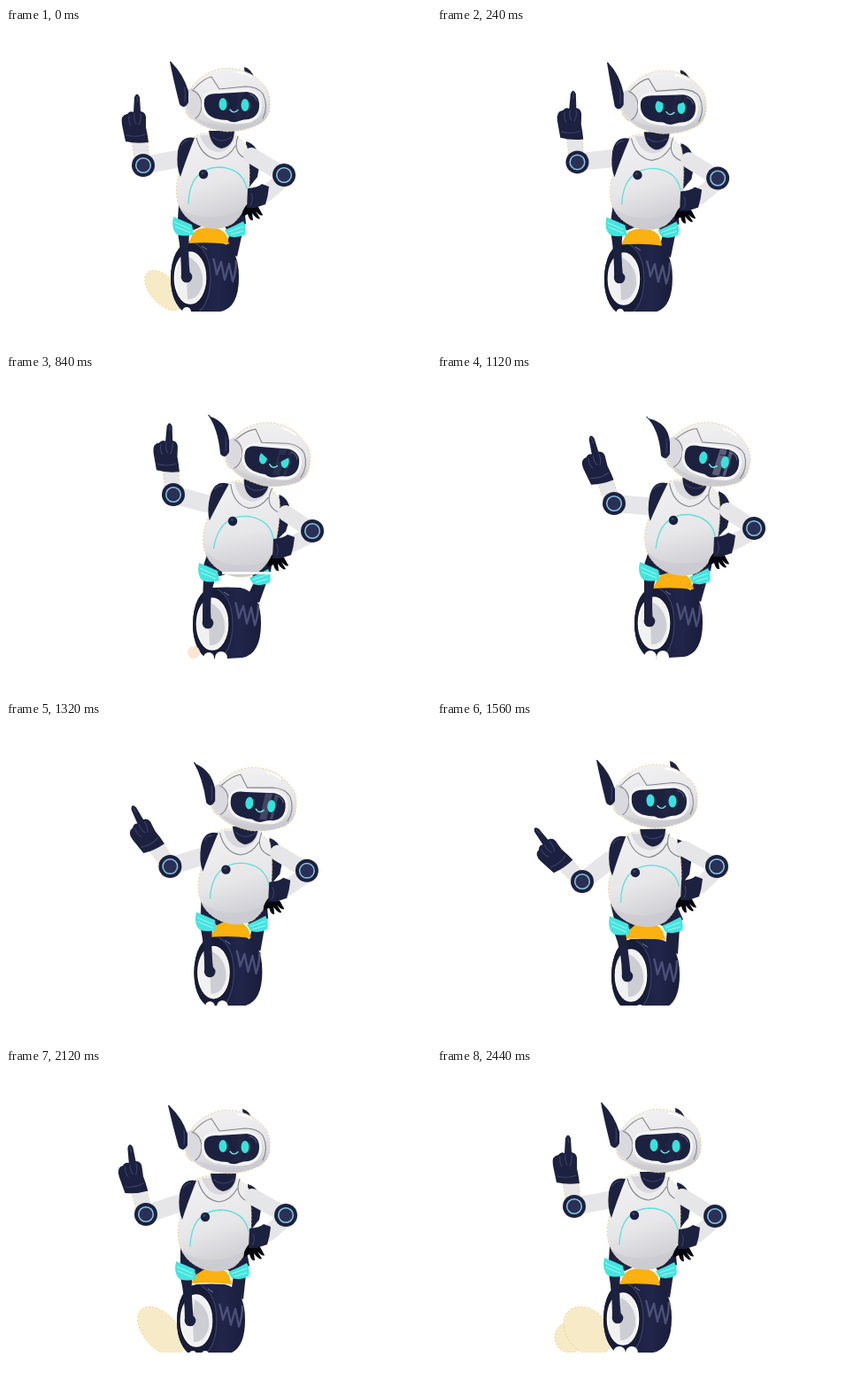
Write an HTML page that moves like this. It is 480 px wide and 360 px high and loops after 2.48 s.

```html
<!DOCTYPE html>
<html lang="en">
<head>
<meta charset="utf-8">
<title>Robot on a wheel</title>
<style>
html, body { margin: 0; width: 100%; height: 100%; overflow: hidden; background: #fff; }
svg { display: block; width: 100vw; height: 100vh; }
.ink { fill: #1d2140; }
.line { fill: none; stroke: #85868c; stroke-width: 1.1; stroke-linecap: round; stroke-linejoin: round; }
.cyan { fill: none; stroke: #62dfdc; stroke-width: 1.3; stroke-linecap: round; }
.glow { fill: #35e3dc; }
.edge { stroke: #e9c566; stroke-width: .7; stroke-dasharray: 2 2; }
.limb { fill: none; stroke: #e6e6e9; stroke-linecap: round; }
.crease { fill: none; stroke: #3b4068; stroke-width: 1.1; stroke-linecap: round; }
</style>
</head>
<body>
<svg viewBox="0 0 480 360" xmlns="http://www.w3.org/2000/svg">
  <defs>
    <linearGradient id="shell" x1="0" y1="0" x2=".25" y2="1">
      <stop offset="0" stop-color="#f3f3f4"/><stop offset=".62" stop-color="#e7e7e9"/><stop offset="1" stop-color="#cfcfd4"/>
    </linearGradient>
    <linearGradient id="tyre" x1="0" y1="0" x2="1" y2="0">
      <stop offset="0" stop-color="#191d39"/><stop offset=".7" stop-color="#20254a"/><stop offset="1" stop-color="#191d39"/>
    </linearGradient>
    <clipPath id="ground"><rect width="480" height="320"/></clipPath>
    <clipPath id="disc"><ellipse cx="208" cy="282" rx="17.5" ry="29"/></clipPath>
  </defs>

  <g clip-path="url(#ground)">
    <g fill="#f7ebc7" class="edge">
      <ellipse id="dustB"/><ellipse id="dustA"/>
    </g>
    <path id="shinR" class="ink"/>
    <g id="wheel">
      <path fill="url(#tyre)" d="M208 241 Q224 240 240 241 Q263 246 263 281 Q263 316 242 320 L208 322 Q186 316 186 282 Q187 246 208 241Z"/>
      <ellipse cx="208" cy="282" rx="22" ry="40.5" fill="#181c36"/>
      <path class="crease" d="M214 243 Q231 252 231 283 Q230 310 219 319"/>
      <path id="tread" fill="none" stroke="#4b5078" stroke-width="2.4" stroke-linejoin="round" d="M234 260 Q236 266 238 278 L243 264 L247 284 L252 266 L256 286 Q260 275 260 262"/>
      <path fill="none" stroke="#777b99" stroke-width="1" d="M221 246 L227 250"/>
      <ellipse cx="208" cy="282" rx="17.5" ry="29" fill="#f1f1f2"/>
      <path clip-path="url(#disc)" fill="#cdced3" d="M206 258 Q224 268 222 290 Q217 307 205 306 L204 280Z"/>
      <ellipse cx="208" cy="282" rx="17.5" ry="29" fill="none" stroke="#fff" stroke-width="1.6"/>
      <circle id="puffA" cx="204" cy="320" fill="#fff"/>
      <circle id="puffB" cx="218" cy="320" fill="#fff"/>
      <circle id="puffC" cx="187" cy="314" fill="#fbe6d3"/>
    </g>
  </g>

  <path id="seat" fill="#fbb10f" d="M206 243 L211 232 Q216 225 229 225 Q244 225 249 234 L252 244 Q229 241 206 243Z"/>
  <path id="shinL" class="ink"/>
  <circle id="hub" class="ink" r="6.3"/>
  <path id="thighL" class="ink"/>
  <path id="thighR" class="ink"/>

  <path id="upperL" class="limb" stroke-width="20"/>
  <path id="foreR" class="limb" stroke-width="18"/>

  <g id="body">
    <path class="ink" d="M271 128 Q284 131 287 150 L284 168 Q279 174 273 182Z"/>
    <path class="edge" fill="url(#shell)" d="M213 122 Q203 135 199 155 Q190 175 193 192 Q197 215 221 224 Q240 230 256 221 Q275 205 275 175 Q276 150 272 133 Q262 121 250 119 L222 119Z"/>
    <path fill="#c9c9cf" opacity=".55" d="M197 203 Q212 215 237 213 Q258 211 268 203 Q263 217 249 224 Q235 229 219 223 Q203 217 197 203Z"/>
    <path class="ink" d="M213 124 Q197 121 194 139 Q192 157 197 168 Q202 152 213 124Z"/>
    <path class="crease" d="M198 132 Q201 127 206 127"/>
    <path fill="#d9d9dd" d="M219 121 Q225 139 240 140 Q254 139 259 121Z"/>
    <path class="ink" d="M229 116 L258 116 Q257 134 243 136 Q231 133 229 116Z"/>
    <path class="crease" d="M233 123 Q243 131 255 123"/>
    <path class="line" d="M215 124 Q221 146 239 148 Q252 146 259 133 M262 122 Q255 142 273 148"/>
    <path class="cyan" d="M206 198 Q207 159 240 157 Q267 158 272 181"/>
    <circle class="ink" cx="223" cy="165" r="5.2"/>
    <circle cx="222" cy="163.5" r="1.5" fill="#3b4068"/>
  </g>

  <path id="upperR" class="limb" stroke-width="18"/>

  <path id="kneeL" fill="#43e5e0" d="M189 213 Q199 217 210 222 L212 233 Q201 236 193 233 Q186 227 189 213Z"/>
  <path id="kneeLines" fill="none" stroke="#a4f4ef" stroke-width="1" d="M190 219 L208 227 M191 224 L208 231"/>
  <g id="kneeR">
    <path fill="#43e5e0" d="M247 228 Q259 223 268 218 Q272 225 270 233 Q261 238 251 235Z"/>
    <path fill="none" stroke="#a4f4ef" stroke-width="1" d="M251 230 L268 224 M254 233 L268 229"/>
  </g>

  <g id="hip">
    <path fill="#05060d" d="M272 199 L285 202 L290 211 Q288 213 282 207 L287 215 Q284 217 278 209 L279 217 Q275 218 273 210 L267 213 Q265 208 272 199Z"/>
    <path class="ink" d="M273 181 Q285 180 289 176 L297 179 Q296 190 293 199 L281 203 L272 203Z"/>
    <path class="crease" d="M277 187 Q280 195 276 200"/>
  </g>

  <g id="foreL">
    <path class="edge" fill="#e6e6e9" d="M142 127 L160 127 L162 150 L146 153Z"/>
    <path class="ink" d="M135 128 L131 109 Q129 98 137 97 Q140 93 144 95 L145 78 Q148 71 151 78 L152 94 Q159 95 158 104 L158 112 Q160 121 161 129Q147 131 135 128Z"/>
    <path class="crease" d="M139 99 Q138 106 141 110 M145 97 Q144 104 147 108 M152 97 Q153 104 150 109 M136 121 Q148 124 157 120"/>
    <path class="crease" d="M148 77 L148.5 83"/>
  </g>

  <g id="elbowL"><circle class="ink" r="13"/><circle r="8.3" fill="#2b3056" stroke="#86c9e2" stroke-width="1.5"/></g>
  <g id="elbowR"><circle class="ink" r="13"/><circle r="8.3" fill="#2b3056" stroke="#86c9e2" stroke-width="1.5"/></g>

  <path id="earR" class="ink" d="M269 44 Q276 45 281 57 L270 55Z"/>
  <g id="head">
    <path class="edge" fill="url(#shell)" d="M204 96 Q198 82 207 71 Q219 50 245 45.500 Q272 44 288 61 Q299 70 298 88 Q298 101 287 108 Q269 117 249 117 Q224 114 213 104 Q206 102 204 96Z"/>
    <path fill="#c9c9cf" opacity=".6" d="M213 101 Q232 110 256 110 Q281 109 295 94 Q295 103 286 108 Q268 116 249 116 Q224 113 213 101Z"/>
    <ellipse cx="211" cy="84" rx="9" ry="16" fill="#dadade" transform="rotate(-8 211 84)"/>
    <path class="line" d="M210 70 Q221 74 221 88 Q220 98 214 102"/>
    <path class="line" stroke-width="1.4" d="M212 69 Q223 57 232 55 L241 69 L270 66 Q284 66 290 74 M290 74 Q297 88 290 102"/>
    <path fill="none" stroke="#fff" stroke-width="2" stroke-linecap="round" d="M262 50 Q271 51 277 55"/>
    <path fill="#f5f5f6" d="M221 81 Q224 70 240 70 L272 69 Q289 72 289 88 Q288 103 274 107 Q255 110 235 105 Q219 99 221 81Z"/>
    <path class="ink" d="M224 81 Q226 73 240 74 L272 72 Q286 74 286 87 Q286 100 274 103 Q268 103 263 105 Q256 108 250 104 Q243 104 236 102 Q222 97 224 81Z"/>
    <path id="gloss" fill="#8f93a8" d="M262 73 L270 73 L266 103 L258 103Z M273 73 L277 74 L273 102 L270 102Z"/>
    <path fill="none" stroke="#555a80" stroke-width="1.2" stroke-linecap="round" d="M276 75 Q282 77 283 82"/>
    <ellipse class="glow" cx="245" cy="86" rx="4.500" ry="7"/>
    <ellipse class="glow" cx="270" cy="87" rx="4.500" ry="7"/>
    <path id="lids" class="ink"/>
    <path fill="none" stroke="#6fe9e6" stroke-width="1.4" stroke-linecap="round" d="M253 92 Q257 97.500 262 92.500"/>
  </g>
  <path id="earL" class="ink"/>
  <path id="shine" class="crease"/>
  <path id="gap" stroke="#fff" stroke-width="2.500" d="M244 223.500 H311"/>
</svg>

<script>
const LOOP = 2480, STEP = 40;
const TIMES = [0, 480, 840, 1120, 1560, 2120, 2440];
const el = id => document.getElementById(id);
const set = (id, attrs) => { for (const k in attrs) el(id).setAttribute(k, attrs[k]); };
const move = (id, [x, y]) => set(id, { transform: `translate(${x} ${y})` });

// Periodic monotone cubic through the given values
function track(vals, times = TIMES) {
  const n = vals.length;
  const mod = i => (i + n) % n;
  const gap = i => (times[mod(i + 1)] - times[mod(i)] + LOOP) % LOOP;
  const slope = i => (vals[mod(i + 1)] - vals[mod(i)]) / gap(i);
  const tangent = i => {
    const a = slope(i - 1), b = slope(i);
    return a * b <= 0 ? 0 : 2 * a * b / (a + b);
  };
  return t => {
    let i = n - 1;
    while (i > 0 && times[i] > t) i--;
    if (times[i] > t) i = n - 1;
    const h = gap(i), u = ((t - times[i] + LOOP) % LOOP) / h;
    const u2 = u * u, u3 = u2 * u;
    return vals[i] * (2 * u3 - 3 * u2 + 1) + tangent(i) * h * (u3 - 2 * u2 + u)
      + vals[mod(i + 1)] * (3 * u2 - 2 * u3) + tangent(i + 1) * h * (u3 - u2);
  };
}
const point = (xs, ys) => {
  const x = track(xs), y = track(ys);
  return t => [x(t), y(t)];
};

const chest = point([0, 11, 33, 44, 1, 2, 0], [0, 2, 0, -1, 5, 2, 0]);
const lean = track([0, 4, 8, 5, -1, 0, 0]);
const head = point([0, 18, 45, 55, -4, 0, 0], [0, 6.5, 9, 9, 2.5, 1, 0]);
const tilt = track([0, 4, 8, 10, 0, 0, 0]);
const frown = track([0, 1, 1, .1, 0, 0, 0]);
const gloss = track([.04, .04, .12, .55, .04, .04, .04]);
const earBase = point([201, 216, 247, 258, 196, 200, 201], [83, 88, 86, 88, 88, 85, 83]);
const earTip = point([185, 205, 228, 236, 180, 183, 185], [38, 41, 45, 47, 43, 41, 38]);
const earBend = track([0, .2, .9, 1.2, 0, 0, 0]);
const earR = point([0, 16, 33, 38, -6, -2, 0], [0, 10, 24, 24, 0, 1, 0]);
const shoulderL = point([193, 205, 226, 238, 195, 194, 193], [148, 146, 145, 148, 156, 152, 148]);
const elbowL = point([155, 166, 189, 200, 164, 158, 155], [155, 145, 135, 145, 180, 164, 155]);
const swing = track([0, 3.5, 2, -14, -36.5, -8, 0]);
const shoulderR = point([277, 297, 316, 328, 279, 278, 277], [144, 155, 156, 153, 143, 144, 144]);
const elbowR = point([314, 324, 346, 358, 316, 316, 314], [166, 174, 176, 173, 163, 165, 166]);
const hip = point([0, 7, 29, 40, 3, 2, 0], [0, 7, 4, 2, -2, -1, 0]);
const kneeL = point([0, 8, 29, 40, 6, 3, 0], [0, 1, -1, -2, 6, 4, 0]);
const kneeR = point([0, 8, 28, 38, 7, 4, 0], [0, 1, 1, 0, 2, 1, 0]);
const seat = point([0, 7, 27, 38, 6, 3, 0], [0, 3, 0, -2, 2, -1, 0]);
const wheel = point([0, 9, 25, 37, 11, 7, 2], [0, 2, -1, -2, 4, 2, 0]);
const hub = point([204, 211, 228, 240, 215, 208, 204], [281, 283, 280, 278, 287, 284, 281]);
const puffA = track([5, 4, 6, 7, 3, 4, 7]);
const puffB = track([0, 0, 7, 7, 5, 4, 7]);
const puffC = track([0, 0, 7, 0], [0, 700, 840, 1000]);
const dustSize = track([.82, 0, 0, 1, .95], [0, 160, 1880, 2120, 2440]);
const dustX = track([178, 178, 188, 175, 170], [0, 160, 1880, 2120, 2440]);
const dustWide = track([18, 18, 16, 19, 24], [0, 160, 1880, 2120, 2440]);
const lobe = track([0, 0, 0, 17], [0, 160, 2200, 2440]);

const segment = (id, [ax, ay], [bx, by]) => set(id, { d: `M${ax} ${ay} L${bx} ${by}` });

function drawEar(t) {
  const [x, y] = earBase(t), [a, b] = earTip(t), c = earBend(t) * 6;
  const lx = (a + x - 5) / 2 - 1 + c, ly = (b + y) / 2 - c;
  set("earL", { d: `M${a} ${b} Q${lx} ${ly} ${x - 5} ${y + 3} Q${x} ${y + 10} ${x + 5} ${y + 1}
    L${x + 5} ${y - 12} Q${(a + x) / 2 + 7 + c} ${b + 14 - c} ${a + 3} ${b + 2} Q${a + 1} ${b - 1} ${a} ${b}Z` });
  set("shine", { d: `M${x + 1} ${y - 16} Q${x + 2} ${y - 8} ${x + 1} ${y}` });
}

function drawLegs(t) {
  const [lx, ly] = kneeL(t), [rx, ry] = kneeR(t), [hx, hy] = hub(t);
  const [bx, by] = chest(t), [wx, wy] = wheel(t);
  set("thighL", { d: `M${195 + bx} ${200 + by} L${225 + bx} ${222 + by} L${212 + lx} ${228 + ly} L${194 + lx} ${216 + ly}Z` });
  set("thighR", { d: `M${269 + bx} ${200 + by} L${271 + rx} ${221 + ry} L${250 + rx} ${229 + ry} L${246 + bx} ${222 + by}Z` });
  set("shinL", { d: `M${194 + lx} ${231 + ly} L${207 + lx} ${232 + ly} Q${hx + 1} ${hy - 30} ${hx + 4} ${hy}
    L${hx - 6} ${hy} Q${hx - 6} ${hy - 28} ${194 + lx} ${231 + ly}Z` });
  set("shinR", { d: `M${253 + rx} ${231 + ry} L${267 + rx} ${231 + ry} L${261 + wx} ${258 + wy} L${247 + wx} ${252 + wy}Z` });
  set("hub", { cx: hx, cy: hy });
  move("kneeL", [lx, ly]);
  move("kneeLines", [lx, ly]);
  move("kneeR", [rx, ry]);
  move("wheel", [wx, wy]);
  move("seat", seat(t));
  set("tread", { transform: `translate(0 ${3 * Math.sin(wx / 6)})` });
  set("puffA", { r: puffA(t) });
  set("puffB", { r: puffB(t) });
  set("puffC", { r: Math.max(0, puffC(t)) });
}

function drawDust(t) {
  const s = Math.max(0, dustSize(t)), x = dustX(t), r = Math.max(0, lobe(t));
  set("dustA", { cx: x, cy: 296, rx: 33 * s, ry: dustWide(t) * s, transform: `rotate(48 ${x} 296)` });
  set("dustB", { cx: 150, cy: 303, rx: r, ry: r });
}

function drawArms(t) {
  const l = elbowL(t), r = elbowR(t), h = hip(t);
  segment("upperL", shoulderL(t), l);
  segment("upperR", shoulderR(t), r);
  segment("foreR", [r[0] + 1, r[1] + 3], [294 + h[0], 187 + h[1]]);
  move("elbowL", l);
  move("elbowR", r);
  move("hip", h);
  set("foreL", { transform: `translate(${l}) rotate(${swing(t)}) translate(-155 -155)` });
}

function draw(t) {
  drawDust(t);
  drawLegs(t);
  drawArms(t);
  drawEar(t);
  move("earR", earR(t));
  set("body", { transform: `translate(${chest(t)}) rotate(${lean(t)} 223 165)` });
  set("head", { transform: `translate(${head(t)}) rotate(${tilt(t)} 255 89)` });
  set("gloss", { opacity: gloss(t) });
  const f = frown(t);
  set("lids", { d: `M238 78 H252 V${78 + 10 * f}Z M277 79 H263 V${79 + 10 * f}Z` });
  const blank = t >= 800 && t < 880;
  set("seat", { visibility: blank ? "hidden" : "visible" });
  set("gap", { visibility: blank ? "visible" : "hidden" });
}

const start = performance.now();
function frame() {
  const t = Math.max(0, performance.now() - start) % LOOP;
  draw(Math.floor(t / STEP) * STEP);
  requestAnimationFrame(frame);
}
frame();
</script>
</body>
</html>
```
